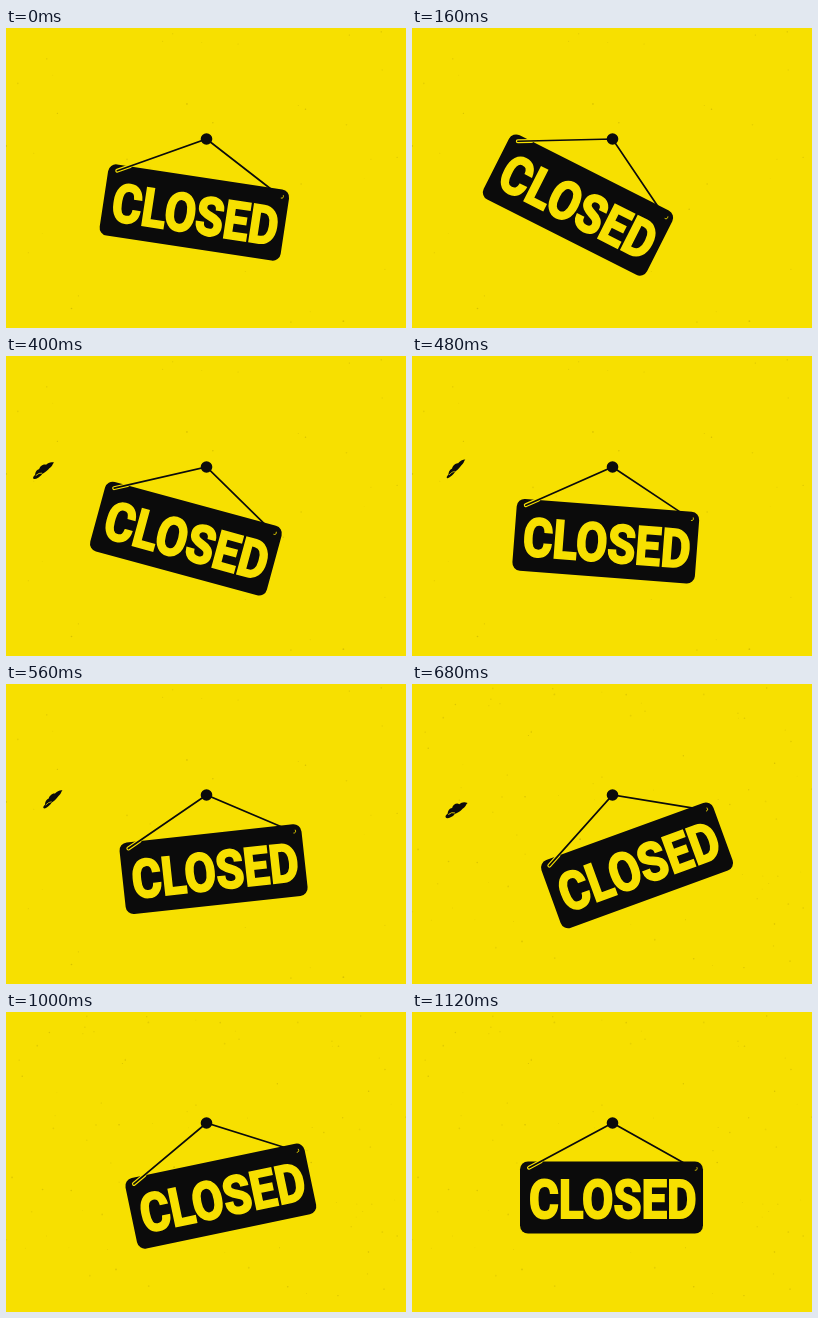
An HTML page for the animation above (1.16 s loop, 400 px wide and 300 px high).

```html
<!DOCTYPE html>
<html lang="en">
<head>
<meta charset="utf-8">
<title>Closed sign</title>
<style>
  html, body { margin: 0; width: 100%; height: 100%; overflow: hidden; background: #f7e000; }
  svg { display: block; width: 100vw; height: 100vh; }
  .label {
    font: 700 53px Roboto, Arial, sans-serif;
    text-anchor: middle;
    fill: #f7e000;
    stroke: #f7e000;
    stroke-width: 2;
  }
  .cord { stroke: #0b0b0b; stroke-width: 1.7; stroke-linecap: round; fill: none; }
  .thin { stroke: #f7e000; stroke-width: .8; stroke-linecap: round; fill: none; }
</style>
</head>
<body>
<svg viewBox="0 0 400 300">
  <rect width="400" height="300" fill="#f7e000"/>
  <g id="sparse" fill="#8a7600"></g>
  <g id="dense" fill="#8a7600"></g>

  <g id="moth">
    <path fill="#0b0b0b" d="M-10 2C-9-2-6-4-3-3C-1-6 4-6 5-3C8-4 11-3 13 0C10 1 10 3 6 3C2 5-5 5-10 2Z"/>
    <ellipse cx="-8" cy="3" rx="5" ry="2.5" fill="#0b0b0b"/>
    <path class="thin" d="M-9 1.5Q-5 .5-3 3"/>
  </g>

  <g id="sign">
    <rect x="108" y="149.5" width="183" height="72" rx="8" fill="#0b0b0b"/>
    <text class="label" transform="translate(200.8 205.9) scale(.86 1)">CLOSED</text>
    <path d="M129 149.3L117 155.7" stroke="#f7e000" stroke-width="4" stroke-linecap="round"/>
    <path class="cord" d="M117 155.7L200.5 111L272 151"/>
    <path class="thin" d="M285 155.5Q286 158.5 283.2 158.3"/>
  </g>
  <circle cx="200.5" cy="111" r="5.8" fill="#0b0b0b"/>
</svg>

<script>
const LOOP = 1160, STEP = 40, COUNT = LOOP / STEP;
const el = id => document.getElementById(id);

// [step, angle]; the outer rows wrap around the loop
const swing = [
  [-1, 0], [0, 8.6], [4, 26.8], [8, 24], [12, 4.4],
  [17, -20], [21, -23.5], [28, 0], [29, 8.6], [33, 26.8]
];

// [step, x, y, tilt, thickness]
const flight = [
  [4, -18, 130, -8, 1], [8, 25, 118, -20, 1], [12, 43.5, 112, -41, .6],
  [17, 44, 125, -27, .9], [21, 22, 165, -4, 1], [25, -18, 205, 5, .9]
];

// Smooth curve through column c of a key table
function curve(keys, t, c) {
  let i = 0;
  while (i < keys.length - 2 && t >= keys[i + 1][0]) i++;
  const slope = k => {
    const a = keys[Math.max(k - 1, 0)], b = keys[Math.min(k + 1, keys.length - 1)];
    return (b[c] - a[c]) / (b[0] - a[0]);
  };
  const p = keys[i], q = keys[i + 1], h = q[0] - p[0];
  const u = (t - p[0]) / h, v = 1 - u;
  return p[c] * v * v * (1 + 2 * u) + q[c] * u * u * (3 - 2 * u)
    + h * u * v * (slope(i) * v - slope(i + 1) * u);
}

// Faint paper specks
function speckle(group, count, seed) {
  const rand = () => (seed = seed * 16807 % 2147483647) / 2147483647;
  let dots = "";
  for (let i = 0; i < count; i++) {
    const x = rand() * 400, y = rand() * 300, r = .4 + rand() * .5, o = .1 + rand() * .2;
    dots += `<circle cx="${x}" cy="${y}" r="${r}" opacity="${o}"/>`;
  }
  group.innerHTML = dots;
}

function draw(step) {
  el("sign").setAttribute("transform", `rotate(${curve(swing, step, 1)} 200.5 111)`);

  const flying = step > 4 && step < 25;
  el("moth").style.display = flying ? "" : "none";
  if (flying) {
    const [x, y, tilt, thick] = [1, 2, 3, 4].map(c => curve(flight, step, c));
    el("moth").setAttribute("transform",
      `translate(${x} ${y}) rotate(${tilt}) scale(1 ${thick})`);
  }

  const late = step > 14;
  el("sparse").style.display = late ? "none" : "";
  el("dense").style.display = late ? "" : "none";
}

speckle(el("sparse"), 35, 41);
speckle(el("dense"), 90, 97);

const start = performance.now();
function tick() {
  draw(Math.floor((performance.now() - start) % LOOP / STEP) % COUNT);
  requestAnimationFrame(tick);
}
draw(0);
requestAnimationFrame(tick);
</script>
</body>
</html>
```
